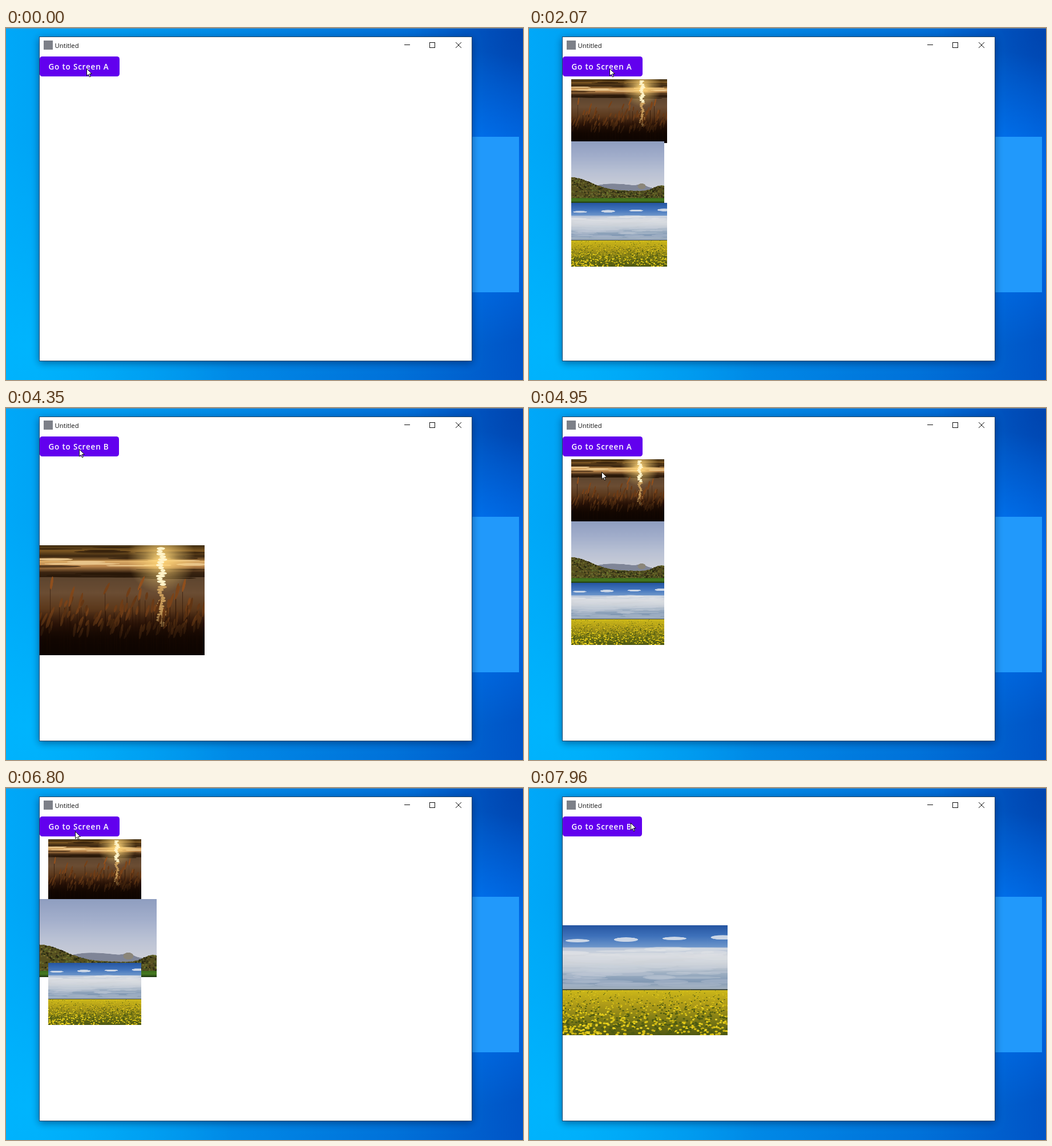
An HTML page with a canvas that plays this animation: 906x618 px, repeating every 8000 ms.

```html
<!DOCTYPE html>
<html lang="en">
<head>
<meta charset="utf-8">
<title>Untitled</title>
<style>
  html, body { margin: 0; width: 100%; height: 100%; overflow: hidden; background: #0084e0; }
  canvas { display: block; }
</style>
</head>
<body>
<canvas id="stage" width="906" height="618"></canvas>
<script>
const W = 906, H = 618, LOOP = 8000;
const ctx = document.getElementById('stage').getContext('2d');
const FONT = '"Open Sans", "Noto Sans", sans-serif';

const BIG = { x: 59, y: 241, w: 289.5, h: 193 };
const slot = i => ({ x: 74, y: 90 + 108.6 * i, w: 163.2, h: 108.6 });
const LOADS = [1835, 1290, 1850];

// One visit per photo: opened, button pressed, back in the gallery
const VISITS = [
  { go: 3366, press: 4350, back: 4450 },
  { go: 5550, press: 6570, back: 6668 },
  { go: 7490, press: Infinity, back: Infinity }
];
const SIZE_LAG = 38;

const HOME = { x: 141, y: 71 };
const MOVES = [
  { at: 2690, dur: 360, x: 126, y: 116 },
  { at: 3600, dur: 340, x: 128, y: 72 },
  { at: 4760, dur: 600, x: 125, y: 238 },
  { at: 5690, dur: 330, x: 121, y: 76 },
  { at: 6930, dur: 380, x: 128, y: 335 },
  { at: 7560, dur: 400, x: 178, y: 61 }
];

const lerp = (a, b, p) => a + (b - a) * p;
const clamp = v => Math.min(1, Math.max(0, v));
const smooth = p => p * p * (3 - 2 * p);
const bump = (x, mid, width) => Math.exp(-(((x - mid) / width) ** 2));

// Unit step of a spring with stiffness 400 and damping ratio 0.75
function spring(ms) {
  if (ms <= 0) return 0;
  const z = 0.75, d = Math.sqrt(1 - z * z), s = ms / 1000 * 20;
  return 1 - Math.exp(-z * s) * (Math.cos(d * s) + z / d * Math.sin(d * s));
}

function seeded(seed) {
  return () => (seed = seed * 16807 % 2147483647) / 2147483647;
}

function box(g, fill, x, y, w, h) {
  g.fillStyle = fill;
  g.fillRect(x, y, w, h);
}

function oval(g, fill, x, y, rx, ry, turn = 0) {
  g.beginPath();
  g.ellipse(x, y, rx, ry, turn, 0, Math.PI * 2);
  g.fillStyle = fill;
  g.fill();
}

// Evenly spaced colours from top to bottom
function shade(g, y, h, ...colors) {
  const f = g.createLinearGradient(0, y, 0, y + h);
  colors.forEach((c, i) => f.addColorStop(i / (colors.length - 1), c));
  box(g, f, 0, y, 300, h);
}

function glow(g, rgb, alpha, x, y, r) {
  const f = g.createRadialGradient(x, y, 0, x, y, r);
  f.addColorStop(0, `rgba(${rgb},${alpha})`);
  f.addColorStop(0.5, `rgba(${rgb},${alpha * 0.45})`);
  f.addColorStop(1, `rgba(${rgb},0)`);
  box(g, f, x - r, y - r, 2 * r, 2 * r);
}

function ridge(g, fill, height) {
  g.beginPath();
  g.moveTo(300, 200);
  g.lineTo(0, 200);
  for (let x = 0; x <= 300; x += 2) g.lineTo(x, height(x));
  g.fillStyle = fill;
  g.fill();
}

// The photos are drawn in a 300 x 200 space
function sunset(g) {
  const rnd = seeded(11);
  shade(g, 0, 30, '#3c2a10', '#7d5722', '#3a2610', '#c08b48');
  shade(g, 28, 32, '#dfb06a', '#b8834a', '#3a2411', '#2a1a0c');
  shade(g, 58, 142, '#5d452f', '#6b4d33', '#5c391c', '#36190a', '#180902', '#0e0501');
  for (let i = 0; i < 26; i++) {
    const y = 4 + 56 * rnd();
    oval(g, y > 24 && y < 38 ? '#e8c48a' : 'rgba(40,24,9,.65)', 300 * rnd(), y, 25 + 45 * rnd(), 1 + 1.5 * rnd());
  }
  glow(g, '255,214,120', 1, 221, 25, 62);
  for (let y = 6; y < 150; y += 5) {
    oval(g, y < 75 ? '#fff3c8' : 'rgba(240,190,110,.7)', 221 + 3 * Math.sin(y), y, 4 + 5 * rnd(), 2.6);
  }
  for (let i = 0; i < 110; i++) {
    const x = 300 * rnd(), y = 60 + 100 * Math.sqrt(rnd()), lean = 0.1 + 0.4 * rnd();
    const light = 34 - y * 0.11 + 8 * rnd();
    box(g, 'rgba(40,18,5,.6)', x - 3, y + 8, 1, 200);
    oval(g, `hsl(26 66% ${light}%)`, x, y, 2.4, 6 + 9 * rnd(), lean);
  }
  shade(g, 120, 80, 'rgba(14,5,1,0)', 'rgba(14,5,1,.55)', 'rgba(14,5,1,.95)');
}

function hills(g) {
  const rnd = seeded(5);
  const land = x => 160 - 44 * bump(x, 0, 90) - 18 * bump(x, 288, 30);
  shade(g, 0, 150, '#8f9ec0', '#a2aecb', '#b9c1d4', '#cbced8');
  ridge(g, '#7f8597', x => 152 - 13 * bump(x, 120, 60) - 7 * bump(x, 190, 50) - 8 * bump(x, 228, 18));
  oval(g, '#8b8679', 227, 146, 13, 9);
  ridge(g, '#56501f', x => land(x) + 2 * rnd());
  for (let i = 0; i < 700; i++) {
    const x = 300 * rnd(), y = lerp(land(x) + 2, 188, rnd());
    oval(g, `hsl(${44 + 30 * rnd()} 42% ${10 + 24 * rnd()}%)`, x, y, 2.6, 2);
  }
  shade(g, 184, 16, '#3d6c1c', '#467a20', '#1d3510');
}

function field(g) {
  const rnd = seeded(29);
  shade(g, 0, 40, '#2656a2', '#3f72bb', '#6f97cb');
  shade(g, 40, 78, '#b5c3d8', '#d6d9de', '#cdd2d8', '#9fb0c3', '#8299b4', '#a9b5c1');
  for (let i = 0; i < 70; i++) {
    const d = rnd();
    oval(g, `rgba(${232 - 60 * d},${233 - 48 * d},${234 - 30 * d},.5)`, 300 * rnd(), 43 + 66 * d, 20 + 50 * rnd(), 1.5 + 3 * rnd());
  }
  for (let i = 0; i < 4; i++) oval(g, '#cbd6e6', 27 + 88 * i, 28 - 2 * i, 22, 3 + i % 2);
  box(g, '#454d42', 0, 116, 300, 2);
  shade(g, 118, 82, '#cdb81a', '#ad9a18', '#7d7a16', '#525a13');
  for (let i = 0; i < 1100; i++) {
    const d = i / 1100, dark = rnd() < 0.25 + 0.25 * d;
    oval(g, dark ? '#4d5a12' : `hsl(53 82% ${40 + 14 * rnd()}%)`, 300 * rnd(), 118 + 82 * d, 0.8 + 2 * d, 0.5 + 1.5 * d);
  }
}

function layer(w, h, scale, paint) {
  const c = document.createElement('canvas');
  c.width = w * scale;
  c.height = h * scale;
  const g = c.getContext('2d');
  g.scale(scale, scale);
  paint(g);
  return c;
}

function paintDesktop(g) {
  const sky = g.createLinearGradient(0, 0, W, 0);
  ['#00a8f8', '#0097ed', '#0084e4', '#0071d9', '#0054c6'].forEach((c, i) => sky.addColorStop(i / 4, c));
  box(g, sky, 0, 0, W, H);
  glow(g, '0,184,255', 0.8, 40, 560, 360);
  glow(g, '0,62,165', 0.7, W, 10, 190);
  glow(g, '0,122,255', 1, 815, 300, 260);
  box(g, '#2199fb', 626, 191, 273, 273);
  box(g, '#728a9f', 0, 0, W, 1);

  g.save();
  g.shadowColor = 'rgba(0,20,60,.5)';
  g.shadowBlur = 13;
  g.shadowOffsetY = 3;
  box(g, '#1d4669', 58, 15, 759, 570);
  g.restore();
  box(g, '#fff', 59, 16, 757, 568);

  box(g, '#7d8088', 66, 22, 16, 16);
  g.fillStyle = '#111';
  g.font = '11.3px ' + FONT;
  g.fillText('Untitled', 85.5, 35);
  box(g, '#111', 698, 29, 10, 1);
  g.strokeStyle = '#111';
  g.strokeRect(742.5, 25.5, 9, 9);
  g.beginPath();
  for (const side of [-5, 5]) {
    g.moveTo(793 - side, 25);
    g.lineTo(793 + side, 35);
  }
  g.stroke();
}

const desktop = layer(W, H, 1, paintDesktop);
const photos = [sunset, hills, field].map(paint => layer(300, 200, 2, paint));

// The centre and the size move on separate springs
function blend(a, b, pos, size) {
  const w = lerp(a.w, b.w, size), h = lerp(a.h, b.h, size);
  const cx = lerp(a.x + a.w / 2, b.x + b.w / 2, pos);
  const cy = lerp(a.y + a.h / 2, b.y + b.h / 2, pos);
  return { x: cx - w / 2, y: cy - h / 2, w, h };
}

function galleryPlace(i, t) {
  const to = slot(i), since = t - VISITS[i].back;
  if (since >= 0) return blend(BIG, to, spring(since), spring(since - SIZE_LAG));
  const p = spring(t - LOADS[i]);
  return blend({ x: 59, y: to.y, w: 0, h: 0 }, to, p, p);
}

function drawPhoto(i, r) {
  if (r.w > 0.5) ctx.drawImage(photos[i], r.x, r.y, r.w, r.h);
}

function pointerAt(t) {
  return MOVES.reduce((from, m) => {
    const p = smooth(clamp((t - m.at) / m.dur));
    return { x: lerp(from.x, m.x, p), y: lerp(from.y, m.y, p) };
  }, HOME);
}

function drawButton(t, visit) {
  const w = visit ? 139 : 140;
  ctx.save();
  ctx.beginPath();
  ctx.roundRect(59, 50, w, 35, 4.5);
  ctx.clip();
  box(ctx, '#6200ee', 59, 50, w, 35);
  if (visit && t >= visit.press) {
    const p = clamp((t - visit.press) / 150), { x, y } = pointerAt(t);
    oval(ctx, `rgba(255,255,255,${0.22 * clamp(p * 2)})`, x, y, 20 + 70 * p, 20 + 70 * p);
  }
  ctx.restore();
  ctx.fillStyle = '#fff';
  ctx.font = '600 13.5px ' + FONT;
  ctx.letterSpacing = '0.8px';
  ctx.fillText('Go to Screen ' + (visit ? 'B' : 'A'), 74.5, 73);
}

function drawPointer(t) {
  const { x, y } = pointerAt(t);
  ctx.save();
  ctx.translate(Math.round(x) + 0.5, Math.round(y) + 0.5);
  const arrow = new Path2D('M0 0V12.5L2.9 9.8 5 14.5 6.8 13.7 4.8 9H8.8Z');
  ctx.fillStyle = '#fff';
  ctx.fill(arrow);
  ctx.strokeStyle = '#000';
  ctx.lineWidth = 0.9;
  ctx.stroke(arrow);
  ctx.restore();
}

function draw(t) {
  const open = VISITS.findIndex(v => t >= v.go && t < v.back);
  const visit = VISITS[open];
  ctx.drawImage(desktop, 0, 0);
  ctx.save();
  ctx.beginPath();
  ctx.rect(59, 46, 757, 538);
  ctx.clip();
  drawButton(t, visit);
  if (visit) {
    const p = spring(t - visit.go);
    drawPhoto(open, blend(slot(open), BIG, p, p));
  } else {
    photos.forEach((_, i) => drawPhoto(i, galleryPlace(i, t)));
  }
  ctx.restore();
  drawPointer(t);
}

const start = performance.now();
function tick() {
  draw((performance.now() - start) % LOOP);
  requestAnimationFrame(tick);
}
tick();
</script>
</body>
</html>
```
